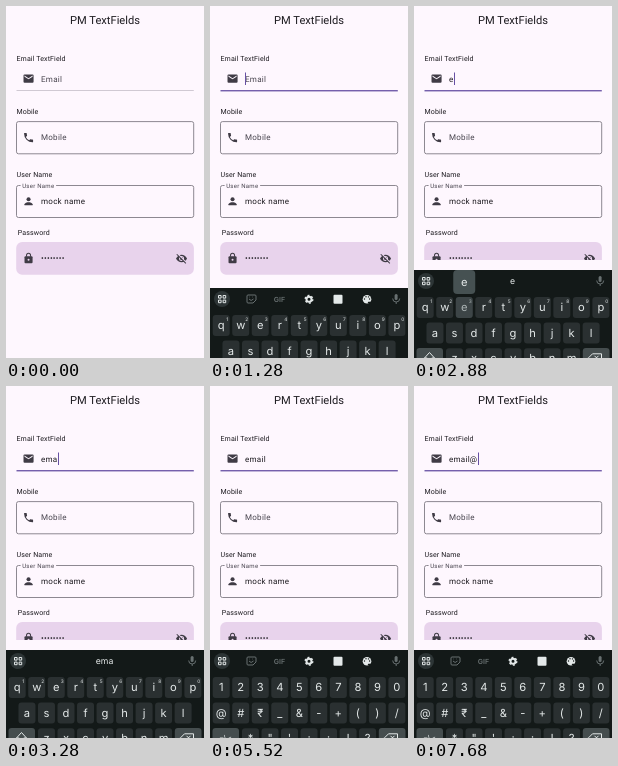
An HTML page for the animation above (8 s loop, 198 by 352 pixels).

```html
<!DOCTYPE html>
<html lang="en">
<head>
<meta charset="utf-8">
<title>Text fields</title>
<style>
  html, body { margin: 0; width: 100%; height: 100%; overflow: hidden; background: #fef7fe; }
  svg { display: block; }
  text { font-family: Roboto, sans-serif; white-space: pre; text-rendering: geometricPrecision; fill: #1d1b20; }
  .label { font-size: 7.06px; letter-spacing: .11px; }
  .input { font-size: 8.06px; letter-spacing: .252px; }
  .hint { fill: #49454f; }
  .outline { fill: none; stroke: #79747e; stroke-width: .85; }
  .icon { fill: #3f3b45; }
  #keyboard text { font-family: Inter, sans-serif; fill: #e4e9e9; text-anchor: middle; }
  .glyph { font-size: 11.2px; }
  .mark { font-size: 4.8px; }
  .key { fill: #2a3031; }
  .side { fill: #454d4e; }
  .line { fill: none; stroke: #e4e9e9; stroke-width: 1; stroke-linejoin: round; }
  .dim { stroke: #687071; }
</style>
</head>
<body>
<svg width="198" height="352" viewBox="0 0 198 352">
  <rect width="198" height="352" fill="#fef7fe"/>
  <clipPath id="body"><rect id="bodyArea" width="198" height="352"/></clipPath>

  <g clip-path="url(#body)">
    <text x="99" y="18.3" font-size="11.15" text-anchor="middle">PM TextFields</text>

    <text class="label" x="10.5" y="55.2">Email TextField</text>
    <g class="icon" transform="translate(16.5 66.6) scale(.504)">
      <path d="M4 4h16a2 2 0 0 1 2 2v12a2 2 0 0 1-2 2H4a2 2 0 0 1-2-2V6a2 2 0 0 1 2-2zM4 6v2l8 5 8-5V6l-8 5z" fill-rule="evenodd"/>
    </g>
    <text class="input" id="email" x="35" y="75.9"></text>
    <rect id="cursor" y="66.5" width="1" height="12.5" fill="#6750a4"/>
    <rect id="underline" x="10.5" y="84.1" width="177.3"/>

    <text class="label" x="10.5" y="108">Mobile</text>
    <rect class="outline" x="10.5" y="115.6" width="177.2" height="32.2" rx="2"/>
    <g class="icon" transform="translate(16.5 125.6) scale(.504)">
      <path d="M6.6 10.8a15 15 0 0 0 6.6 6.6l2.2-2.2q.5-.4 1-.2 1.7.5 3.6.5a1 1 0 0 1 1 1V20a1 1 0 0 1-1 1A17 17 0 0 1 3 4a1 1 0 0 1 1-1h3.5a1 1 0 0 1 1 1q0 1.9.6 3.6.1.5-.3 1z"/>
    </g>
    <text class="input hint" x="35" y="134.1">Mobile</text>

    <text class="label" x="10.5" y="171.2">User Name</text>
    <rect class="outline" x="10.5" y="179.5" width="177.2" height="32" rx="2"/>
    <rect x="14.6" y="178" width="35.5" height="3" fill="#fef7fe"/>
    <text x="16.2" y="181.5" class="hint" font-size="6.05" letter-spacing=".25">User Name</text>
    <g class="icon" transform="translate(16.5 189.2) scale(.504)">
      <circle cx="12" cy="8" r="4"/>
      <path d="M12 14c-2.7 0-8 1.3-8 4v2h16v-2c0-2.7-5.300-4-8-4z"/>
    </g>
    <text class="input" x="35" y="198">mock name</text>

    <text class="label" x="11.8" y="229.4">Password</text>
    <rect x="10.2" y="236" width="177.7" height="32.8" rx="6" fill="#e8d3ec"/>
    <g class="icon" transform="translate(16.5 246.2) scale(.504)">
      <rect x="4" y="8" width="16" height="14" rx="2"/>
      <path d="M8 9V6a4 4 0 0 1 8 0v3" fill="none" stroke="#3f3b45" stroke-width="2"/>
      <circle cx="12" cy="15" r="2" fill="#e8d3ec"/>
    </g>
    <text class="input" x="35" y="255.3">••••••••</text>
    <g class="icon" transform="translate(169.5 246.5) scale(.504)">
      <path d="M1 12Q5 4.5 12 4.5T23 12Q19 19.5 12 19.5T1 12z"/>
      <circle cx="12" cy="12" r="4" stroke="#e8d3ec" stroke-width="2"/>
      <path d="M4 2.5L22 20.5" stroke="#e8d3ec" stroke-width="2.5"/>
      <path d="M2.5 3.5L20.5 21.5" stroke="#3f3b45" stroke-width="2"/>
    </g>
  </g>

  <g id="keyboard">
    <rect y="264" width="198" height="90" fill="#131918"/>
    <circle cx="12" cy="275" r="8" fill="#2d3536"/>
    <path class="line" d="M8.5 271.5h2.6v2.6h-2.6zm4.6 0h2.6v2.6h-2.6zm-4.6 4.6h2.6v2.6h-2.6zm4.6 0h2.6v2.6h-2.6z"/>
    <g id="toolbar">
      <path class="line dim" d="M38 271h7a1 1 0 0 1 1 1v4l-3 3h-5a1 1 0 0 1-1-1v-6a1 1 0 0 1 1-1zM39 275q2 3 4.5 0M39.5 273h.5m2.5 0h.5"/>
      <text x="69.5" y="277.8" font-size="7" font-weight="600" style="fill:#687071">GIF</text>
      <circle class="line" cx="99" cy="275.2" r="2.5" style="stroke-width:2"/>
      <circle class="line" cx="99" cy="275.2" r="3.8" stroke-dasharray="1.99" style="stroke-width:1.4"/>
      <rect x="123.5" y="270.8" width="9" height="9" rx="1" fill="#e4e9e9"/>
      <circle cx="157" cy="275.2" r="4.3" fill="#e4e9e9"/>
      <path d="M154.5 275h.01M156 272.7h.01M158.5 272.9h.01M159.6 275h.01M158.5 278.5h2" stroke="#131918" stroke-width="1.4" stroke-linecap="round"/>
    </g>
    <text id="suggestion" x="98.5" y="278.4" font-size="8.7"></text>
    <rect x="184.6" y="270" width="3" height="6" rx="1.5" fill="#687071"/>
    <path class="line dim" d="M182.7 274.5a3.5 3.5 0 0 0 7 0M186.2 278v2"/>
    <g id="letters"></g>
    <g id="symbols"></g>
    <rect class="side" x="168.8" y="342" width="26.7" height="21" rx="3"/>
    <rect id="pressed" height="21" rx="3" fill="#5b6768"/>
    <path class="line" d="M178.5 347.8h9v8h-9l-4-4zM180.5 349.8l4 4m0-4l-4 4"/>
    <g id="popup">
      <rect x="-11" y="-27" width="22" height="24" rx="4" fill="#465152"/>
      <text class="glyph" y="-11"></text>
    </g>
  </g>
</svg>
<script>
const LOOP = 8000, PITCH = 19.52, ROW = 25.6, KEY_TOP = 291;
const $ = id => document.getElementById(id);
const set = (el, attrs) => { for (const k in attrs) el.setAttribute(k, attrs[k]); };
const show = (el, on) => set(el, { visibility: on ? 'visible' : 'hidden' });

function add(parent, tag, attrs, text = '') {
  const el = document.createElementNS('http://www.w3.org/2000/svg', tag);
  set(el, attrs);
  el.textContent = text;
  parent.append(el);
}

const keys = { back: { x: 182.15, y: 342, w: 26.7 } };

function buildKeys(parent, rows, hints) {
  add(parent, 'rect', { class: 'side', x: 2.5, y: 342, width: 26.5, height: 21, rx: 3 });
  rows.forEach((row, r) => [...row].forEach((char, i) => {
    const x = 11.2 + (10 - row.length) * PITCH / 2 + i * PITCH, y = KEY_TOP + r * ROW;
    keys[char] = { x, y, w: 17 };
    add(parent, 'rect', { class: 'key', x: x - 8.5, y, width: 17, height: 21, rx: 3 });
    add(parent, 'text', { class: 'glyph', x, y: y + 14 }, char);
    if (hints && r === 0) add(parent, 'text', { class: 'mark', x: x + 6, y: y + 6 }, (i + 1) % 10);
  }));
}
buildKeys($('letters'), ['qwertyuiop', 'asdfghjkl', 'zxcvbnm'], true);
buildKeys($('symbols'), ['1234567890', '@#₹_&-+()/', '*"\':;!?']);
add($('letters'), 'path', { class: 'line', d: 'M15.5 346.5l5 5.5h-2.7v4h-4.6v-4h-2.7z' });
add($('symbols'), 'text', { x: 15.5, y: 355, 'font-size': 8 }, '=\\<');

const typed = [[0, ''], [2880, 'e'], [3040, 'em'], [3200, 'ema'], [3520, 'emai'], [3840, 'email'],
  [5120, 'email '], [6160, 'email @'], [6720, 'email '], [6880, 'email'], [7600, 'email@']];
const presses = [['e', 2800, 2960], ['m', 2960, 3120], ['a', 3120, 3280], ['i', 3440, 3640], ['l', 3760, 3920],
  ['@', 6080, 6320], ['back', 6480, 6640], ['back', 6720, 6880], ['@', 7520, 7680]];
const blinks = [960, 1360, 1840, 2400, 2880, 4320, 4800, 5520, 6080, 7360, 7520];

function draw(t) {
  const focused = t >= 960;
  const slide = Math.min(1, Math.max(0, (t - 1040) / 590));
  const drop = Math.round(88 * (1 - slide) ** 3);
  set($('keyboard'), { transform: `translate(0 ${drop})` });
  set($('bodyArea'), { height: drop < 88 ? 254 + drop : 352 });
  set($('underline'), focused ? { height: 1.3, fill: '#6750a4' } : { height: .7, fill: '#bdb7c2' });

  const text = typed.findLast(([start]) => t >= start)[1];
  const email = $('email');
  email.textContent = text || 'Email';
  email.classList.toggle('hint', !text);
  set($('cursor'), { x: 35 + (text ? Math.ceil(email.getComputedTextLength()) : 0) });
  show($('cursor'), blinks.filter(start => t >= start).length % 2);

  const suggesting = (t >= 2880 && t < 5200) || (t >= 6880 && t < 7600);
  $('suggestion').textContent = suggesting ? text.trim() : '';
  show($('toolbar'), !suggesting);
  show($('letters'), t < 5360);
  show($('symbols'), t >= 5360);

  const press = presses.find(([, start, end]) => t >= start && t < end);
  show($('pressed'), press);
  show($('popup'), press && press[0] !== 'back');
  if (press) {
    const { x, y, w } = keys[press[0]];
    set($('pressed'), { x: x - w / 2, y, width: w, 'fill-opacity': press[0] === 'back' ? 1 : .4 });
    set($('popup'), { transform: `translate(${x} ${y})` });
    $('popup').lastElementChild.textContent = press[0];
  }
}

const begin = performance.now();
function tick() {
  draw((performance.now() - begin) % LOOP);
  requestAnimationFrame(tick);
}
tick();
</script>
</body>
</html>
```
